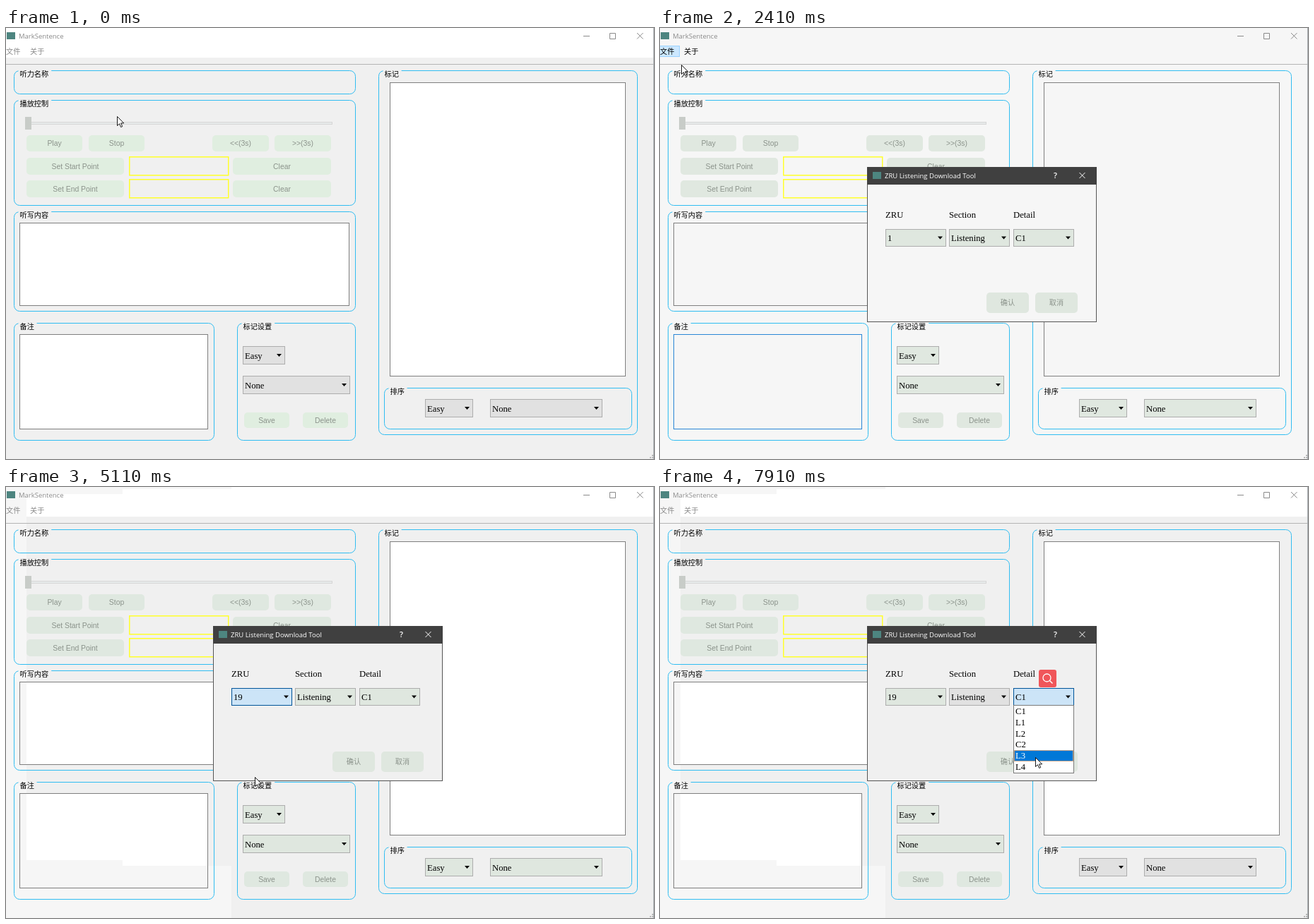
Recreate the animation shown at these times as an HTML page. Size 917 px wide and 611 px high, loop 8 s.

```html
<!DOCTYPE html>
<html lang="zh-CN">
<head>
<meta charset="utf-8">
<style>
html, body { margin: 0; width: 100%; height: 100%; overflow: hidden; background: #f0f0f0; }
svg { display: block; width: 917px; height: 611px; }
text { white-space: pre; }
.cjk { font: 10.2px "Noto Sans CJK SC", "Noto Sans CJK", sans-serif; }
.ui { font: 9.5px "Open Sans", "Noto Sans", sans-serif; }
.btn-text { font: 10.4px "Liberation Sans", Arial, sans-serif; fill: #8b938b; text-anchor: middle; }
.btn-text.cjk { font: 10.2px "Noto Sans CJK SC", "Noto Sans CJK", sans-serif; }
.serif { font: 12.7px "Liberation Serif", "Times New Roman", serif; }
.bg { fill: var(--bg); }
.paper { fill: var(--paper); }
.edit { fill: var(--paper); stroke: #7f7f7f; }
.note { stroke: var(--focus); }
.btn { fill: var(--btn); }
.combo { fill: var(--combo); stroke: #adadad; }
.right { fill: var(--right); }
.group { fill: none; stroke: #30bdf1; }
.bar { fill: var(--bar); }
.title { fill: var(--title); }
.ctrl { fill: none; stroke: var(--title); }
.menu-text { fill: var(--menu); }
.menu-hot { display: var(--hot); }
.combo.hover { fill: #e5f1fb; stroke: #0078d7; }
.combo.open { fill: #cce4f7; stroke: #005499; }
.row-hot { fill: #0078d7; stroke: #ff8728; stroke-dasharray: 1 1; }
#number { --combo: #dfe7df; }
#wash { --bg: #f6f6f6; --paper: #f6f6f6; --bar: #f6f6f6; --btn: #e0e8e0; --combo: #e0e8e0; --right: #e0e8e0; }
</style>
</head>
<body>
<svg id="stage" viewBox="0 0 917 611"></svg>
<script>
const stage = document.getElementById('stage');
const $ = id => document.getElementById(id);

const rect = (x, y, w, h, attrs = '') => `<rect x="${x}" y="${y}" width="${w}" height="${h}" ${attrs}/>`;
const line = (x, y, r, b, attrs = '') => rect(x + .5, y + .5, r - x - 1, b - y - 1, attrs);
const text = (x, y, s, cls, attrs = '') => `<text x="${x}" y="${y}" class="${cls}" ${attrs}>${s}</text>`;
const path = (d, attrs = '') => `<path d="${d}" ${attrs}/>`;
const icon = (x, y) => rect(x, y, 12, 10, 'fill="#4d8580"');

function group(x, y, r, b, label) {
  const gap = x + 10 + [...label].length * 10.3 + 2, arc = 'a8 8 0 0 1 ';
  return path(`M${gap} ${y + .5}H${r - 8.5}${arc}8 8V${b - 8.5}${arc}-8 8H${x + 8.5}${arc}-8 -8V${y + 8.5}${arc}6 -7.7`, 'class="group"')
    + text(x + 8.5, y + 9, label, 'cjk');
}

function button(x, y, r, b, label, cls = '') {
  const safe = label.replace(/</g, '&lt;').replace(/>/g, '&gt;');
  return rect(x, y, r - x, b - y, 'rx="5" class="btn"')
    + text((x + r) / 2, (y + b) / 2 + 3.8, safe, 'btn-text ' + cls);
}

function combo(x, y, r, b, label, cls = '', id = '') {
  const box = id ? `id="${id}"` : '', val = id ? `id="${id}-value"` : '';
  return line(x, y, r, b, `class="combo ${cls}" ${box}`)
    + text(x + 3, (y + b) / 2 + 4.7, label, 'serif', val)
    + path(`M${r - 12} ${(y + b) / 2 - 2}h7l-3.5 4z`);
}

function mainWindow() {
  const yellow = y => rect(174.75, y + .75, 140, 26, 'fill="none" stroke="#ffff2c" stroke-width="1.5"');
  return rect(0, 0, 917, 611, 'class="bg"')
    + rect(0, 0, 917, 42, 'class="paper"') + rect(0, 0, 917, 24, 'class="bar"')
    + icon(1, 6) + text(18, 15, 'MarkSentence', 'ui title')
    + path('M817 11.5h9M854.5 7.5h8v8h-8zM893 7l8.5 8.5M901.5 7l-8.5 8.5', 'class="ctrl"')
    + '<g class="menu-hot">' + line(-1, 25, 28, 41, 'fill="#cce8ff" stroke="#99d1ff"') + '</g>'
    + text(0, 37, '文件', 'cjk menu-text') + text(34, 37, '关于', 'cjk menu-text')
    + rect(0, 51, 917, 1, 'fill="#b4b4b4"')
    + group(11, 60, 495, 94, '听力名称') + group(11, 102, 495, 252, '播放控制')
    + group(11, 260, 495, 402, '听写内容') + group(11, 418, 295, 585, '备注')
    + group(327, 418, 495, 585, '标记设置') + group(527, 60, 894, 577, '标记')
    + group(535, 510, 886, 569, '排序')
    + line(28, 133, 462, 137, 'fill="#e7eaea" stroke="#d6d6d6"') + rect(27, 126, 9, 18, 'fill="#c8ccc8"')
    + button(29, 152, 108, 175, 'Play') + button(117, 152, 196, 175, 'Stop')
    + button(292, 152, 372, 175, '<<(3s)') + button(380, 152, 460, 175, '>>(3s)')
    + button(29, 184, 167, 208, 'Set Start Point') + button(321, 184, 460, 208, 'Clear')
    + button(29, 216, 167, 240, 'Set End Point') + button(321, 216, 460, 240, 'Clear')
    + yellow(182) + yellow(214)
    + line(19, 276, 486, 394, 'class="edit"') + line(19, 434, 286, 569, 'class="edit note"')
    + line(543, 77, 877, 494, 'class="edit"')
    + combo(335, 451, 395, 477, 'Easy') + combo(335, 493, 487, 519, 'None')
    + combo(593, 526, 661, 552, 'Easy', 'right') + combo(685, 526, 844, 552, 'None', 'right')
    + button(337, 545, 401, 567, 'Save') + button(420, 545, 484, 567, 'Delete')
    + path('M914 606h2M911 609h2M914 609h2', 'stroke="#b8b8b8" stroke-width="2"')
    + rect(916, 0, 1, 611, 'fill="#a4a9ad"');
}

const ROW = 15.8;
const rows = (id, x, n) => Array.from({ length: n }, (_, i) =>
  text(x + 3, 322 + i * ROW, '', 'serif', `id="${id}${i}"`)).join('');

const numberList = '<g id="numbers">' + line(319, 309, 405, 469, 'fill="#fff" stroke="#7a7a7a"')
  + rect(320.5, 310.5, 69, 15, 'id="num-hot" class="row-hot"') + rows('num', 319, 10)
  + rect(390, 310, 14, 158, 'fill="#f0f0f0"') + rect(390, 324, 13, 23, 'id="thumb" fill="#cdcdcd"')
  + path('M393.5 319l3 -3l3 3M393.5 460l3 3l3 -3', 'fill="none" stroke="#505050" stroke-width="1.4"') + '</g>';

const detailList = '<g id="details">' + line(500, 309, 586, 406, 'fill="#fff" stroke="#7a7a7a"')
  + rect(501.5, 310.5, 83, 15, 'id="det-hot" class="row-hot"') + rows('det', 500, 6) + '</g>';

const dialog = '<g id="dialog">' + line(293, 197, 618, 417, 'class="bg" stroke="#555"')
  + rect(293, 197, 325, 25, 'fill="#404040"') + icon(301, 204)
  + text(318, 213, 'ZRU Listening Download Tool', 'ui', 'fill="#fff"')
  + text(557, 213, '?', 'ui', 'fill="#fff" style="font-size:11px;font-weight:600"')
  + path('M593.5 205l8 8M601.5 205l-8 8', 'stroke="#fff"')
  + text(319, 269, 'ZRU', 'serif') + text(409, 269, 'Section', 'serif') + text(500, 269, 'Detail', 'serif')
  + combo(319, 285, 405, 310, '1', '', 'number') + combo(409, 285, 495, 310, 'Listening', '', 'section')
  + combo(500, 285, 586, 310, 'C1', '', 'detail')
  + button(462, 375, 522, 404, '确认', 'cjk') + button(531, 375, 591, 404, '取消', 'cjk') + '</g>';

const fileMenu = '<g id="file-menu">' + line(-1, 41, 84, 82, 'fill="#f2f2f2" stroke="#ccc"')
  + rect(0, 44, 81, 18, 'id="menu-row" fill="#91c9f7"')
  + text(23, 57, '在线下载', 'cjk') + text(23, 75, '打开文件', 'cjk') + '</g>';

const search = '<g id="search">' + rect(536, 259, 25, 25, 'rx="3" fill="#f0565a"')
  + '<circle cx="547.5" cy="270.5" r="5.5" fill="none" stroke="#fff" stroke-width="1.3"/>'
  + path('M551.5 274.5l4 4', 'stroke="#fff" stroke-width="1.4"') + '</g>';

const pointer = path('M.5 .5V13.5L3.5 10.7L5.6 15.5L7.7 14.6L5.6 9.9H9.7Z',
  'id="pointer" fill="#fff" stroke="#000" stroke-width=".9"');

stage.innerHTML = `<defs><g id="window">${mainWindow()}</g><clipPath id="clip"><path id="clip-path"/></clipPath></defs>
<use href="#window"/><use href="#window" id="wash" clip-path="url(#clip)"/>
${fileMenu}${dialog}${numberList}${detailList}${search}${pointer}`;
['C1', 'L1', 'L2', 'C2', 'L3', 'L4'].forEach((s, i) => $('det' + i).textContent = s);

// time, x, y of the pointer tip
const track = [
  [0, 157, 125], [110, 157, 125], [900, 12, 30], [1340, 12, 30], [1490, 30, 52], [2410, 30, 52],
  [2640, 165, 135], [2870, 325, 245], [3100, 381, 295], [3800, 381, 295], [4140, 362, 360],
  [4780, 352, 411], [5170, 352, 411], [5900, 455, 300], [6200, 461, 299], [6550, 461, 299],
  [6900, 527, 296], [7320, 529, 300], [7800, 531, 383], [8000, 531, 383]
];

function pointerAt(t) {
  const i = Math.max(1, track.findIndex(k => k[0] > t));
  const [a, x, y] = track[i - 1], [b, u, v] = track[i];
  const p = (t - a) / (b - a);
  return [Math.round(x + (u - x) * p), Math.round(y + (v - y) * p)];
}

const show = (id, on) => $(id).style.display = on ? '' : 'none';
const within = (t, a, b) => t >= a && t < b;
const setVars = (el, vars) => { for (const k in vars) el.style.setProperty('--' + k, vars[k]); };

// the pale cover is wiped away in steps behind the pointer
function washShape(t) {
  if (t < 2530) return 'M0 0H917V611H0Z';
  if (t < 2640) return 'M0 0H917V10H29V529H917V611H0Z';
  const edge = t < 2760 ? 917 : 319;
  return `M0 0H${edge}V3H165V10H29V529H165V537H${edge}V611H0Z`;
}

function highlight(id, name, count, row) {
  $(id).setAttribute('y', Math.round(310 + row * ROW) + .5);
  for (let i = 0; i < count; i++) $(name + i).setAttribute('fill', i === row ? '#fff' : '#000');
}

function draw(t) {
  const [x, y] = pointerAt(Math.floor(t / 115) * 115);
  const active = within(t, 1030, 2410), dim = t >= 2410;
  setVars(stage, {
    bg: within(t, 2410, 2530) ? '#f6f6f6' : '#f0f0f0', paper: '#fff',
    bar: active ? '#404040' : '#fff',
    title: active ? '#fff' : '#8a8a8a',
    menu: within(t, 1030, 2530) ? '#000' : '#8a8a8a',
    focus: within(t, 1030, 2530) ? '#2a86d6' : '#7f7f7f',
    btn: dim ? '#dfe8e0' : '#e0eee0', combo: dim ? '#dfe7df' : '#e1e1e1',
    right: within(t, 4980, 5820) ? '#dfe7df' : '#e1e1e1',
    hot: within(t, 910, 2530) ? 'inline' : 'none'
  });
  setVars($('dialog'), {
    btn: within(t, 5820, 7320) ? '#dfeee0' : '#dfe7df',
    combo: t < 5820 ? '#dfe7df' : '#e1e1e1'
  });
  show('wash', dim);
  $('clip-path').setAttribute('d', washShape(t));

  show('file-menu', within(t, 1240, 2410));
  show('menu-row', t >= 1450);
  show('dialog', dim);

  const numOpen = within(t, 3230, 4980), detOpen = t >= 7090;
  const rowAt = Math.max(0, Math.floor((y - 310) / ROW));
  show('numbers', numOpen);
  show('details', detOpen);
  show('search', t >= 7200);

  const first = 3 * Math.max(0, Math.min(4, Math.floor((t - 4140) / 120) + 1));
  for (let i = 0; i < 10; i++) $('num' + i).textContent = first + i + 1;
  $('thumb').setAttribute('y', 324 + first / 44 * 107);
  highlight('num-hot', 'num', 10, rowAt);
  highlight('det-hot', 'det', 6, Math.min(5, rowAt));
  $('number-value').textContent = t < 4980 ? 1 : 19;

  const over = (a, b) => x >= a && x < b && within(y, 285, 310);
  const state = (id, open, hover) => $(id).setAttribute('class', 'combo ' + (open ? 'open' : hover ? 'hover' : ''));
  state('number', within(t, 3230, 5340), over(319, 405));
  state('section', false, over(409, 495));
  state('detail', detOpen, over(500, 586));
  $('pointer').setAttribute('transform', `translate(${x} ${y})`);
}

const start = performance.now();
function tick() {
  draw((performance.now() - start) % 8000);
  requestAnimationFrame(tick);
}
tick();
</script>
</body>
</html>
```
